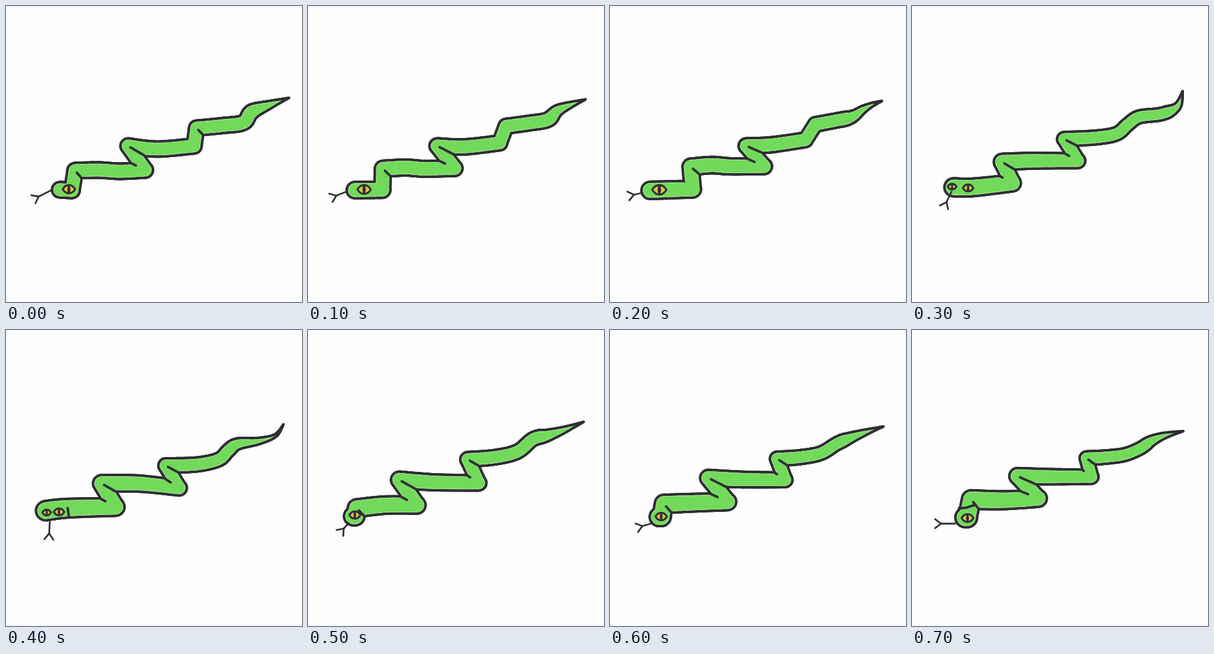
These frames come from a looping animation (480 by 480 pixels, 0.8 s). An HTML page with a canvas:

```html
<!DOCTYPE html>
<html lang="en">
<head>
<meta charset="utf-8">
<title>Slithering snake</title>
<style>
html, body { margin: 0; width: 100%; height: 100%; overflow: hidden; background: #fefefe; }
canvas { display: block; width: 100%; height: 100%; }
</style>
</head>
<body>
<canvas id="stage"></canvas>
<script>
const SIZE = 480, STEP = 100;
const INK = '#2f2f34', GREEN = '#72da5b', PALE = '#a4e68f', YELLOW = '#e2c24a';

const points = text => text.split(' ').map(s => s.split(',').map(Number));

// spine: middle line from head to tail, "|" marks a fold
// width: half width at head and tail; taper: length of the pointed end
// tongue: root and fork; eyes: x, y, half width; mark: extra line on the neck
function pose(spine, width, taper, tongue, eyes, mark) {
  return {
    runs: spine.split('|').map(points), width, taper,
    tongue: points(tongue), eyes: points(eyes), mark: mark ? points(mark) : []
  };
}

function between(a, b) {
  if (typeof a === 'number') return (a + b) / 2;
  if (Array.isArray(a)) return a.map((v, i) => between(v, b[i]));
  return Object.fromEntries(Object.keys(a).map(k => [k, between(a[k], b[k])]));
}

const coil = pose(
  '87,298 107,299|112,267 150,266 185,268 226,266|198,227 245,232 305,227|309,198 350,194 385,189 398,172 425,161 459,149',
  [12.5, 12], 65, '75,298 53,309', '102,297,10');
const reach = pose(
  '65,299 134,297|131,261 165,258 195,260 250,260|221,227 262,225 317,217|333,192 365,186 392,180 410,168 425,160 441,154',
  [14, 11], 65, '52,303 39,306', '80,298,11.5');
const turn = pose(
  '67,294 100,294 163,287|146,253 195,251 269,251|247,216 300,213 332,207 349,193 368,180 405,175 430,163 439,138',
  [14.5, 9.5], 45, '64,301 56,318', '65,293,7 91,295,8.5');
const face = pose(
  '64,293 100,289 178,287|155,249 215,249 281,256|259,220 310,218 345,210 360,196 375,185 410,180 437,171 450,153',
  [15.5, 9.5], 100, '71,311 70,330', '66,296,7 86,295,8.5', '100,289 102,302');
const dip = pose(
  '73,302 77,302|79,289 125,284 177,284|148,243 205,247 277,248|259,210 305,206 340,197 365,177 388,171 415,162 447,149',
  [14.5, 10.5], 75, '66,313 58,322', '76,300,9');
const curl = pose(
  '86,304 90,304|96,275 150,276 205,273|171,237 230,238 291,238|283,208 315,206 345,202 370,192 388,180 410,171 440,164',
  [15.5, 9], 65, '70,314 47,314', '90,305,9.5', '76,289 88,288 101,284');

const poses = [coil, between(coil, reach), reach, turn, face, dip, between(dip, curl), curl];

// Catmull-Rom samples through one run of points.
function smooth(pts, n = 20) {
  const out = [pts[0]];
  for (let i = 0; i < pts.length - 1; i++) {
    const b = pts[i], c = pts[i + 1], a = pts[i - 1] || b, d = pts[i + 2] || c;
    for (let j = 1; j <= n; j++) {
      const t = j / n;
      out.push([0, 1].map(k => b[k] + t / 2 * (c[k] - a[k]
        + t * (2 * a[k] - 5 * b[k] + 4 * c[k] - d[k]
        + t * (3 * (b[k] - c[k]) + d[k] - a[k])))));
    }
  }
  return out;
}

function unit(from, to) {
  const x = to[0] - from[0], y = to[1] - from[1], l = Math.hypot(x, y);
  return [x / l, y / l];
}

// Line in the inner corner of a bend, pointing at the bend itself.
function crease(at, u, v, r, start) {
  const cos = u[0] * v[0] + u[1] * v[1];
  const reach = r / Math.sqrt((1 - cos) / 2);
  if (cos < -0.3 || reach < start * r) return [];
  const w = unit([0, 0], [u[0] + v[0], u[1] + v[1]]);
  return [start * r, reach].map(d => [at[0] + w[0] * d, at[1] + w[1] * d]);
}

function build(p) {
  const spine = p.runs.flatMap(run => smooth(run));
  const dist = [0];
  for (let i = 1; i < spine.length; i++) {
    dist.push(dist[i - 1] + Math.hypot(spine[i][0] - spine[i - 1][0], spine[i][1] - spine[i - 1][1]));
  }
  const total = dist[dist.length - 1];
  const radius = dist.map(s =>
    (p.width[0] + (p.width[1] - p.width[0]) * s / total) * Math.min(1, (total - s) / p.taper));

  const lines = [p.mark];
  let index = 0;
  for (let i = 1; i < p.runs.length; i++) {
    const before = p.runs[i - 1], after = p.runs[i];
    index += (before.length - 1) * 20 + 1;
    const low = before[before.length - 1], high = after[0], r = radius[index];
    lines.push(crease(high, unit(high, after[1]), unit(high, low), r, 0.35));
    lines.push(crease(low, unit(low, before[before.length - 2]), unit(low, high), r, 1.4));
  }
  return { ...p, spine, radius, lines };
}

const stage = document.getElementById('stage');
const ctx = stage.getContext('2d');
const ratio = window.devicePixelRatio || 1;
stage.width = stage.height = SIZE * ratio;
ctx.scale(ratio, ratio);
ctx.lineCap = ctx.lineJoin = 'round';

function line(pts, width, color = INK) {
  ctx.beginPath();
  pts.forEach(q => ctx.lineTo(...q));
  ctx.lineWidth = width;
  ctx.strokeStyle = color;
  ctx.stroke();
}

function tube(s, color, grow) {
  for (let i = 1; i < s.spine.length; i++) {
    const r = s.radius[i] + grow;
    if (r > 0) line([s.spine[i - 1], s.spine[i]], 2 * r, color);
  }
}

function eye([x, y, rx]) {
  const ry = rx * 0.68;
  ctx.beginPath();
  ctx.moveTo(x - rx, y);
  ctx.bezierCurveTo(x - rx / 2, y - ry * 1.3, x + rx / 2, y - ry * 1.3, x + rx, y);
  ctx.bezierCurveTo(x + rx / 2, y + ry * 1.3, x - rx / 2, y + ry * 1.3, x - rx, y);
  ctx.fillStyle = YELLOW;
  ctx.fill();
  ctx.lineWidth = 3.2;
  ctx.strokeStyle = INK;
  ctx.stroke();
  ctx.beginPath();
  ctx.ellipse(x, y, rx * 0.24, ry, 0, 0, 2 * Math.PI);
  ctx.fillStyle = INK;
  ctx.fill();
}

function tongue([root, fork]) {
  const angle = Math.atan2(fork[1] - root[1], fork[0] - root[0]);
  line([root, fork], 2.8);
  for (const turn of [-0.65, 0.65]) {
    line([fork, [fork[0] + 12 * Math.cos(angle + turn), fork[1] + 12 * Math.sin(angle + turn)]], 2.8);
  }
}

function draw(s) {
  ctx.fillStyle = '#fefefe';
  ctx.fillRect(0, 0, SIZE, SIZE);
  tube(s, INK, 2.1);
  tube(s, PALE, -2.1);
  tube(s, GREEN, -3.2);
  s.lines.forEach(l => line(smooth(l.length ? l : [[0, 0]]).slice(l.length ? 0 : 1), 4));
  s.eyes.forEach(eye);
  tongue(s.tongue);
}

const snakes = poses.map(build);
const start = performance.now();

function show(now) {
  draw(snakes[Math.floor(Math.max(0, now - start) / STEP) % snakes.length]);
  requestAnimationFrame(show);
}
show(start);
</script>
</body>
</html>
```
